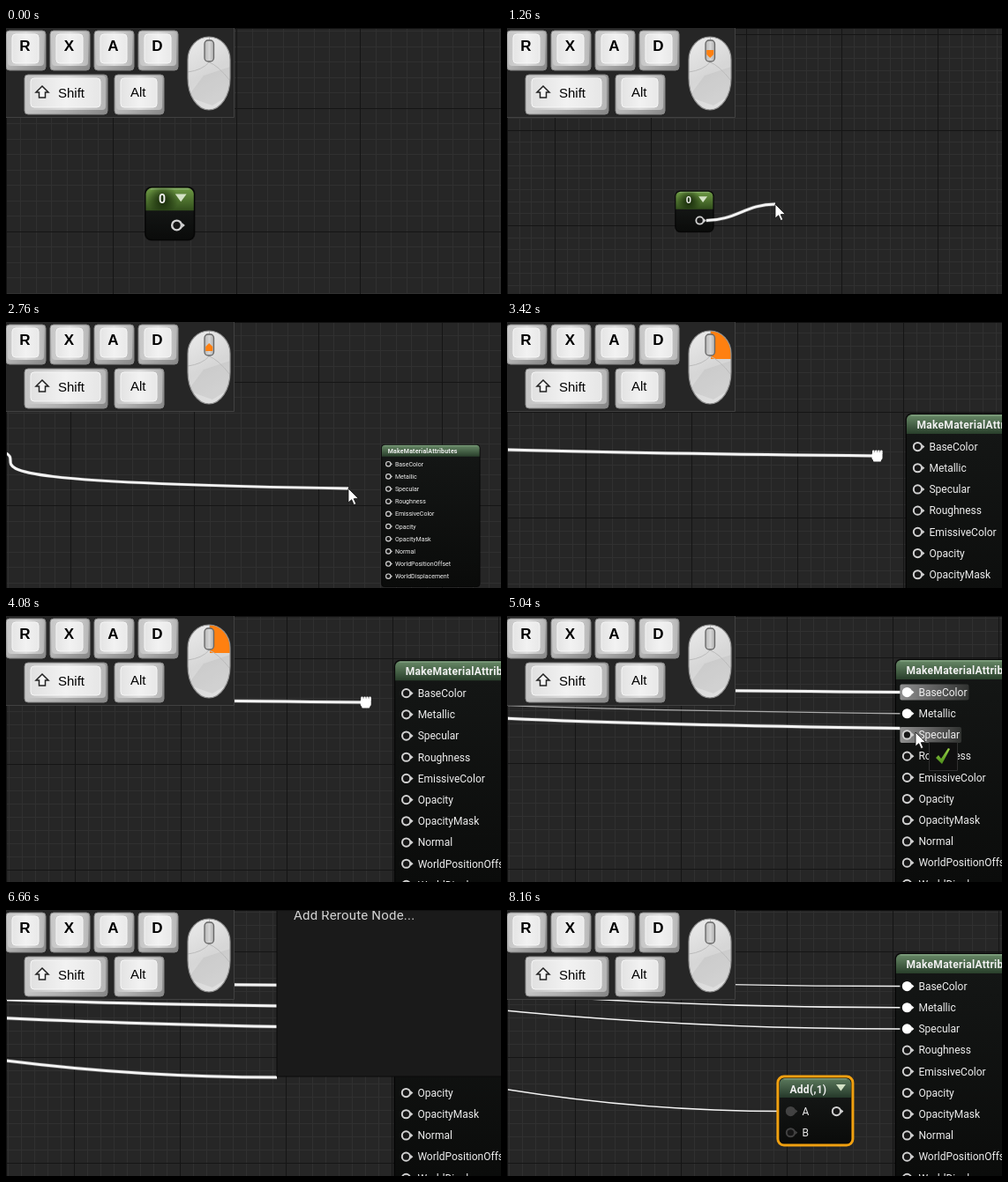
Write an HTML page with a canvas that moves like this. It is 561 by 302 pixels and loops after 8220 ms.

```html
<!DOCTYPE html>
<html lang="en">
<head>
<meta charset="utf-8">
<title>Node graph: multi connect</title>
<style>
html, body { margin: 0; width: 100%; height: 100%; overflow: hidden; background: #262626; }
canvas { display: block; }
</style>
</head>
<body>
<canvas id="stage" width="561" height="302"></canvas>
<script>
const W = 561, H = 302, LOOP = 8220, STEP = 60;
const ctx = document.getElementById('stage').getContext('2d');
const UI = 'Roboto, "Open Sans", sans-serif';
const KEYCAP = '"Liberation Sans", Arial, sans-serif';
const ORANGE = '#ff8010';
const SOURCE = { x: -933, y: 40 };
const GRID = { x: 77, y: 46, cell: 15 };
const PIN = { x: 453, y: 86, row: 24.2 };
const ATTRIBUTES = ['BaseColor', 'Metallic', 'Specular', 'Roughness', 'EmissiveColor', 'Opacity',
  'OpacityMask', 'Normal', 'WorldPositionOffset', 'WorldDisplacement'];
const MATCHES = ['BlendAdditive', 'VectorToRadialValue', 'Add', 'AddComponents',
  'PixelOffset_advanced', 'CameraDepthFade', 'LinearGradient'];

const SHOWN = 60, DRAG = 360, MENU = 5820, TYPING = 6120, PLACED = 7440;
const CLICKS = { left: [300, 5640, 8100], right: [4260, 4800, 5100] };
const move = (from, to, x, y) => ({ type: 'move', from, to, x, y });
const pan = (from, to, x, y) => ({ type: 'pan', from, to, x, y });
const zoom = (from, to, scale) => ({ type: 'zoom', from, to, scale });
const ACTIONS = [
  move(60, 300, 197, 219), move(420, 660, 304, 200), zoom(840, 1620, .5),
  move(1680, 1800, 545, 162), pan(1800, 2100, 238, 209), move(2100, 2220, 481, 208),
  pan(2280, 2460, 261, 93), move(2460, 2520, 388, 189), zoom(2520, 3300, 1),
  move(3300, 3360, 419, 152), pan(3420, 4140, 407, 97), move(4140, 4260, 460, 91),
  move(4380, 4500, 461, 115), move(4860, 4980, 463, 132), move(5220, 5580, 307, 190)
];

const during = (t, from, length) => t >= from && t < from + length;
const mix = (a, b, p) => a + (b - a) * p;
const smooth = p => p * p * (3 - 2 * p);

// Plays the actions up to t; panning drags the view, zooming keeps the pointer's spot fixed.
function stateAt(t) {
  const st = { t, x: 440, y: 170, ox: 1291.5, oy: 177.3, scale: 1.1667, active: '' };
  for (const a of ACTIONS) {
    if (t < a.from) break;
    const p = Math.min(1, (t - a.from) / (a.to - a.from));
    if (t < a.to) st.active = a.type;
    if (a.type === 'zoom') {
      const next = mix(st.scale, a.scale, p ** 1.5), ratio = next / st.scale;
      st.ox = st.x - (st.x - st.ox) * ratio;
      st.oy = st.y - (st.y - st.oy) * ratio;
      st.zoomIn = a.scale > st.scale;
      st.scale = next;
    } else {
      const dx = (a.x - st.x) * smooth(p), dy = (a.y - st.y) * smooth(p);
      st.x += dx;
      st.y += dy;
      if (a.type === 'pan') { st.ox += dx; st.oy += dy; }
    }
  }
  st.dragging = t >= DRAG && t < MENU;
  const row = Math.round((st.y - PIN.y) / PIN.row);
  st.hovered = st.dragging && st.scale === 1 && Math.abs(st.x - 460) < 12 ? row : -1;
  return st;
}

const linked = (t, i) => t >= CLICKS.right[i];
const settled = (t, i) => t >= CLICKS.right[i] + 300;

function gradient(x0, y0, x1, y1, ...colors) {
  const g = ctx.createLinearGradient(x0, y0, x1, y1);
  colors.forEach((c, i) => g.addColorStop(i / (colors.length - 1), c));
  return g;
}

function paint(fill, stroke, width = 1) {
  if (fill) { ctx.fillStyle = fill; ctx.fill(); }
  if (stroke) { ctx.strokeStyle = stroke; ctx.lineWidth = width; ctx.stroke(); }
}

function box(x, y, w, h, r, fill, stroke, width) {
  ctx.beginPath();
  ctx.roundRect(x, y, w, h, r);
  paint(fill, stroke, width);
}

function shape(x, y, points, fill, stroke, width) {
  ctx.beginPath();
  points.forEach(([dx, dy]) => ctx.lineTo(x + dx, y + dy));
  ctx.closePath();
  paint(fill, stroke, width);
}

function label(text, x, y, font, color, spacing = 0) {
  ctx.font = font;
  ctx.letterSpacing = spacing + 'px';
  ctx.fillStyle = color;
  ctx.fillText(text, x, y);
}

function grid({ ox, oy, scale }) {
  ctx.fillStyle = '#262626';
  ctx.fillRect(0, 0, W, H);
  let cell = GRID.cell;
  while (cell * scale < 7.4) cell *= 2;
  const doubled = scale < .65;
  if (doubled) cell = GRID.cell * 2;
  const lines = (color, pitch) => {
    const step = pitch * scale, first = v => ((v % step) + step) % step;
    const top = GRID.y + (doubled ? GRID.cell * 8 : 0);
    ctx.fillStyle = color;
    for (let x = first(ox + GRID.x * scale); x < W; x += step) ctx.fillRect(Math.round(x), 0, 1, H);
    for (let y = first(oy + top * scale); y < H; y += step) ctx.fillRect(0, Math.round(y), W, 1);
  };
  lines('#303030', cell);
  lines('#151515', cell * 8);
}

// A taut wire keeps a slight slope where it meets its end.
function wire(x, y, width, taut, color = '#f4f4f4') {
  const d = (x - SOURCE.x) * (taut ? 1 : .42);
  const lift = taut ? (y - SOURCE.y) * .22 : 0;
  ctx.beginPath();
  ctx.moveTo(SOURCE.x, SOURCE.y);
  ctx.bezierCurveTo(SOURCE.x + d, SOURCE.y, x - d, y - lift, x, y);
  if (width > 2) paint(null, 'rgba(255,255,255,.22)', width + 1.4);
  paint(null, color, width);
}

function pin(x, y, filled, color = '#d2d2d2') {
  ctx.beginPath();
  ctx.arc(x, y, 4.6, 0, 7);
  paint(filled ? color : '#161616', color, 2);
  shape(x, y, [[5, -2.6], [8, 0], [5, 2.6]], color);
}

function nodeFrame(x, y, w, h, light, dark) {
  box(x - 1, y - 1, w + 2, h + 2, 7, 'rgba(0,0,0,.5)');
  box(x, y, w, h, 6, gradient(0, y + 20, 0, y + h, '#141615', '#0a0b0a'), '#050505');
  box(x + .5, y + .5, w - 1, 22, [6, 6, 0, 0], gradient(0, y, 0, y + 22, light, dark));
  ctx.fillStyle = 'rgba(210,235,210,.35)';
  ctx.fillRect(x + 5, y + 1, w - 10, 1);
}

const triangle = (x, y) => shape(x, y, [[-5.5, -3.5], [5.5, -3.5], [0, 4]], '#d4e2c6');

function constantNode() {
  const x = SOURCE.x - 38.6, y = SOURCE.y - 36.8;
  nodeFrame(x, y, 47.5, 51, '#6f9b45', '#33501d');
  const glow = ctx.createRadialGradient(x + 17, y + 12, 2, x + 17, y + 12, 15);
  glow.addColorStop(0, 'rgba(10,25,0,.75)');
  glow.addColorStop(1, 'rgba(10,25,0,0)');
  ctx.fillStyle = glow;
  ctx.fillRect(x + 1, y + 1, 34, 21);
  label('0', x + 13, y + 15.5, `bold 12px ${UI}`, '#f0f0f0');
  triangle(x + 34.5, y + 10);
  pin(x + 30.5, y + 36.8, false);
}

function materialNode({ t, hovered }) {
  nodeFrame(440, 49, 190, 275, '#6a8c69', '#2a402c');
  label('MakeMaterialAttributes', 452, 65.5, `bold 12px ${UI}`, '#f0f0f0', .3);
  ATTRIBUTES.forEach((name, i) => {
    const y = PIN.y + i * PIN.row;
    ctx.font = `12px ${UI}`;
    ctx.letterSpacing = '0px';
    if (i === hovered || (settled(t, i) && t < PLACED)) {
      const w = ctx.measureText(name).width + 23;
      box(445, y - 9, w, 18, 2, gradient(445, 0, 445 + w, 0, '#909090', '#606060', '#303230'));
    }
    pin(PIN.x, y, linked(t, i), linked(t, i) ? '#fff' : undefined);
    label(name, 466, y + 4.3, `12px ${UI}`, '#efefef');
  });
}

function addNode() {
  nodeFrame(308, 190, 82, 75, '#5d7b5e', '#263a2b');
  label('Add(,1)', 320, 207.5, `bold 12px ${UI}`, '#f0f0f0', .3);
  triangle(378, 201);
  pin(373, 228, false);
  ['A', 'B'].forEach((name, i) => {
    pin(321, 228 + i * PIN.row, i === 0, '#424242');
    label(name, 334, 232.3 + i * PIN.row, `12px ${UI}`, '#e8e8e8');
  });
  box(306.5, 188.5, 85, 78, 7, null, '#f0a010', 3);
}

function wires({ t, x, y, ox, oy, scale, hovered }) {
  const placed = t >= PLACED;
  CLICKS.right.forEach((_, i) => {
    if (!linked(t, i)) return;
    const thick = settled(t, i) && !placed;
    wire(445, PIN.y + i * PIN.row, thick ? 3 : 1.4, !placed, thick || placed ? '#f4f4f4' : '#aaa');
  });
  if (placed) wire(315, 228, 1.4, false);
  else if (hovered >= 0) wire(445, y - 5, 3, true);
  else if (t >= DRAG) wire((x - ox) / scale, (y - oy) / scale, 3 / scale, scale > .5 && during(t, 2520, 2700));
}

function checkTip(x, y) {
  box(x + .5, y + .5, 32, 32, 0, '#0f0f0f', '#303030');
  shape(x, y, [[8, 18], [11, 15], [14, 19], [22, 7], [24, 8], [15, 25]],
    gradient(0, y + 7, 0, y + 25, '#9bd448', '#4c8d1b'));
}

function cancelTip(x, y) {
  box(x + .5, y + .5, 186, 32, 0, '#0f0f0f', '#303030');
  const ax = x + 19, ay = y + 16;
  for (let i = -1; i <= 1; i++) {
    const dx = 10 - Math.abs(i), dy = i * 6.5;
    ctx.beginPath();
    ctx.moveTo(ax, ay);
    ctx.lineTo(ax + dx, ay + dy);
    paint(null, '#ddd', 1.5);
    box(ax + dx - 2, ay + dy - 2, 4, 4, 1, '#ddd');
  }
  box(ax - 3, ay - 3, 6, 6, 3, '#ddd');
  label('Right click to cancel', x + 38, y + 21, `15px ${UI}`, '#ccc');
}

function cursor(x, y, hand) {
  if (hand) {
    box(x - 5.5, y - 4, 12, 9, 3, '#fff');
    for (let i = 0; i < 4; i++) box(x - 5 + i * 3, y - 6.5, 2.6, 5, 1.3, '#fff');
    box(x - 4, y + 2, 9, 4.5, 1, '#fff');
  } else {
    shape(x, y, [[0, 0], [0, 16], [3.7, 12.7], [6.3, 18.6], [8.8, 17.5], [6.2, 11.7], [11.2, 11.2]],
      '#fff', '#111', .8);
  }
}

function menu(t) {
  box(307, -2, 256, 191, 0, '#1a1a1a', '#0a0a0a');
  const filtered = t >= TYPING + 420;
  const rows = filtered ? ['Add Reroute Node...'] : MATCHES;
  rows.forEach((name, i) => label(name, 326, (filtered ? 11 : 27) + i * 22, `15px ${UI}`, '#d4d4d4', .2));
}

function keycap(x, y, w, pressed) {
  box(x, y, w, 45, 4, gradient(x, y, x + w, y + 45, '#cfcfcf', '#b2b2b2', '#868686'), '#858585');
  box(x + 2, y + 1, w - 4, 39, 4, gradient(x, 0, x + w, 0, '#c4c4c4', '#dcdcdc', '#b4b4b4'));
  box(x + 7, y + 4, w - 15, 33, 4,
    pressed ? ORANGE : gradient(x, 0, x + w, 0, '#dedede', '#f2f2f2', '#e4e4e4'), '#f6f6f6');
}

function mouse({ t, active, zoomIn }) {
  const pressed = side => CLICKS[side].some(at => during(t, at, 60));
  const top = { x: 24, y: 26 }, bottom = { x: 24, y: 36 };
  const body = (fill, stroke) => box(206, 10, 48, 83, [top, top, bottom, bottom], fill, stroke, 1.2);
  ctx.save();
  body(gradient(206, 10, 252, 93, '#ececec', '#d6d6d6', '#e2e2e2'));
  ctx.clip();
  shape(206, 44, [[0, 34], [18, 10], [48, 0], [48, 32], [28, 44]], 'rgba(165,165,165,.22)');
  ctx.fillStyle = ORANGE;
  if (pressed('left')) ctx.fillRect(206, 10, 24, 32);
  if (pressed('right') || active === 'pan') ctx.fillRect(231, 10, 24, 32);
  ctx.beginPath();
  ctx.moveTo(206, 50);
  ctx.quadraticCurveTo(222, 48, 230, 39);
  ctx.quadraticCurveTo(240, 42, 254, 60);
  ctx.moveTo(230.5, 10);
  ctx.lineTo(230.5, 15);
  paint(null, '#bbb');
  ctx.restore();
  body(null, '#8f8f8f');
  box(225, 14, 10.5, 24, 4, gradient(225, 0, 236, 0, '#b5b5b5', '#d6d6d6', '#aaa'), '#666', 1.3);
  if (active === 'zoom') {
    const d = zoomIn ? -1 : 1;
    shape(230.2, 29, [[-4, -4 * d], [4, -4 * d], [4, d], [0, 5 * d], [-4, d]], ORANGE);
  }
}

function inputPanel(state) {
  box(-1, -1, 259.5, 102.5, 0, '#262626', '#414141');
  const typed = [...'ADD'].find((_, i) => during(state.t, TYPING + i * 210, 120));
  ctx.textAlign = 'center';
  [...'RXAD'].forEach((key, i) => {
    keycap(i * 50, 3, 45, key === typed);
    label(key, i * 50 + 21.5, 26, `bold 17px ${KEYCAP}`, '#000');
  });
  ctx.textAlign = 'left';
  keycap(21, 53, 94);
  keycap(123, 53, 56);
  label('Shift', 59, 79, `15px ${KEYCAP}`, '#000');
  label('Alt', 141, 78, `15px ${KEYCAP}`, '#000');
  shape(41, 66, [[0, 0], [7, 7], [3.5, 7], [3.5, 13], [-3.5, 13], [-3.5, 7], [-7, 7]], '#f4f4f4', '#222', 1.5);
  mouse(state);
}

function draw(t) {
  const state = stateAt(t);
  const { x, y, active, hovered, dragging } = state;
  grid(state);
  ctx.save();
  ctx.translate(state.ox, state.oy);
  ctx.scale(state.scale, state.scale);
  constantNode();
  materialNode(state);
  wires(state);
  if (t >= PLACED) addNode();
  ctx.restore();

  if (t >= MENU && t < PLACED) menu(t);
  if (hovered >= 0) checkTip(x + 15, y + 11);
  else if (dragging && t > 1680 && active !== 'pan' && active !== 'zoom') cancelTip(x + 16, y + 17);
  if (t >= SHOWN && t < TYPING) cursor(x, y, active === 'pan');
  inputPanel(state);
  ctx.fillStyle = '#111';
  ctx.fillRect(259, 0, W, 1);
  ctx.fillRect(0, 102, 1, H);
}

const start = performance.now();
function tick() {
  const t = (performance.now() - start) % LOOP;
  draw(Math.floor(t / STEP) * STEP);
  requestAnimationFrame(tick);
}
tick();
</script>
</body>
</html>
```
